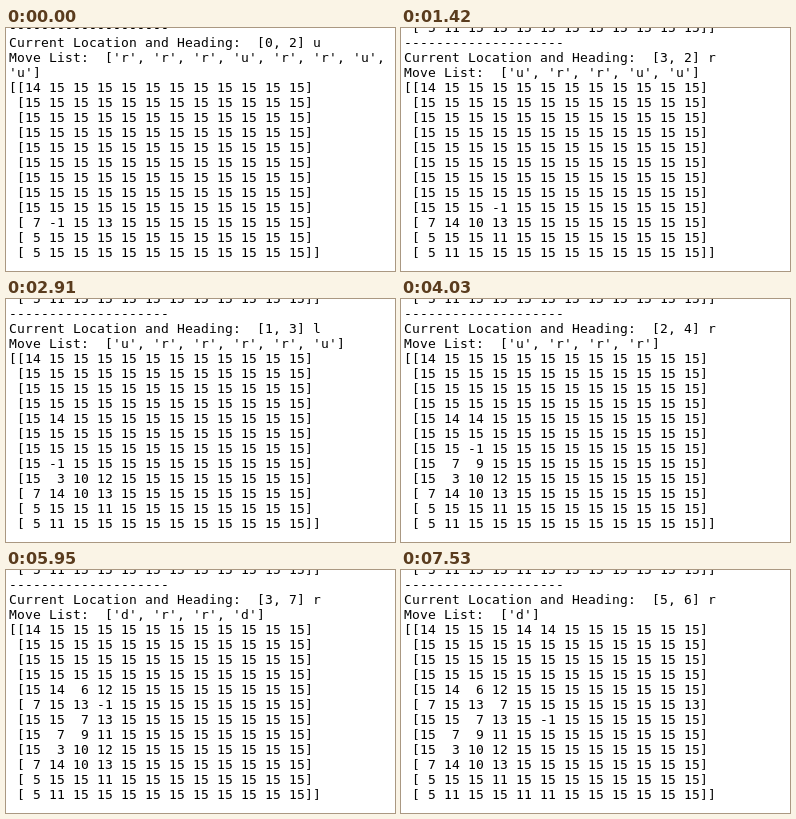
An HTML page that plays this animation: 389x243 px, repeating every 8000 ms.

```html
<!DOCTYPE html>
<html lang="en">
<head>
<meta charset="utf-8">
<title>Maze explorer log</title>
<style>
  html, body { margin: 0; width: 100%; height: 100%; overflow: hidden; background: #fff; }
  svg { display: block; width: 389px; height: 243px; }
  text {
    font-family: "DejaVu Sans Mono", monospace;
    font-size: 13px;
    fill: #000;
    white-space: pre;
  }
</style>
</head>
<body>
<svg id="screen" viewBox="0 0 389 243"></svg>
<script>
const LOOP = 8000, SIZE = 12, COLS = 48, LINES = 16, CHAR_W = 8, LINE_H = 15;
const TIMES = [0, 420, 850, 1420, 1960, 2380, 2910, 3470,
  4030, 4420, 5000, 5420, 5950, 6370, 6950, 7530];

// Directions in clockwise order; direction i owns bit 1 << i of a cell's openings
const DIRS = 'urdl';
const DELTA = [[0, 1], [1, 0], [0, -1], [-1, 0]];

// Walls of the maze, by the xy of the cell on their left or below them
const RIGHT_WALLS = '00 01 03 04 15 17 24 26 32 33 35 37 64'.split(' ');
const TOP_WALLS = '12 17 21 22 23 27 30 33 37'.split(' ');

// Routes to the goal; the next one is taken when the current one turns out blocked
const ROUTES = 'rrrurruu lurrru lurrrru rurrr urrrd urrrdd rdrrd ddrru'.split(' ');

const move = ([x, y], d) => [x + DELTA[d][0], y + DELTA[d][1]];
const inside = cell => cell.every(v => v >= 0 && v < SIZE);

function hasWall(cell, d) {
  const next = move(cell, d);
  const owner = d < 2 ? cell : next;
  return !inside(next) || (d % 2 ? RIGHT_WALLS : TOP_WALLS).includes(owner.join(''));
}

// Look left, ahead and right, and close the side where each ray ends
function sense(grid, pos, heading) {
  for (const turn of [3, 0, 1]) {
    const d = (heading + turn) % 4;
    let cell = pos;
    while (!hasWall(cell, d)) cell = move(cell, d);
    grid[cell[1]][cell[0]] &= ~(1 << d);
  }
}

function isBlocked(grid, pos, route) {
  for (const step of route) {
    const d = DIRS.indexOf(step);
    if (!(grid[pos[1]][pos[0]] & 1 << d)) return true;
    pos = move(pos, d);
  }
  return false;
}

function formatGrid(grid, [mx, my]) {
  return grid.map((row, y) => {
    const cells = row.map((v, x) => String(x === mx && y === my ? -1 : v).padStart(2));
    return (y < SIZE - 1 ? ' [' : '[[') + cells.join(' ') + (y ? ']' : ']]');
  }).reverse();
}

// Explore the maze once, keeping the terminal's visible lines for every step
function buildScreens() {
  const grid = Array.from({ length: SIZE }, () => Array(SIZE).fill(15));
  const routes = [...ROUTES];
  let pos = [0, 2], heading = 0, route = routes.shift(), log = [];
  sense(grid, [0, 0], heading);
  sense(grid, [0, 1], heading);

  return TIMES.map(start => {
    sense(grid, pos, heading);
    if (isBlocked(grid, pos, route)) route = routes.shift();
    const turn = DIRS.indexOf(route[0]);
    const next = move(pos, turn);
    const moves = 'Move List:  [' + [...route].map(m => `'${m}'`).join(', ') + ']';

    log.push('-'.repeat(20), `Current Location and Heading:  [${pos.join(', ')}] ${DIRS[heading]}`);
    for (let i = 0; i < moves.length; i += COLS) log.push(moves.slice(i, i + COLS));
    log = log.concat(formatGrid(grid, next)).slice(-LINES);

    pos = next;
    heading = turn;
    route = route.slice(1);
    return { start, lines: [...log] };
  });
}

const screens = buildScreens();
const svg = document.getElementById('screen');
const columns = Array.from({ length: COLS }, (_, i) => 3 + CHAR_W * i).join(' ');
const rows = Array.from({ length: LINES }, (_, i) => {
  const row = document.createElementNS('http://www.w3.org/2000/svg', 'text');
  row.setAttribute('x', columns);
  row.setAttribute('y', 4 + LINE_H * i);
  return svg.appendChild(row);
});

let shown = null;
function draw(time) {
  const t = time % LOOP;
  const screen = screens.filter(s => s.start <= t).pop();
  if (screen === shown) return;
  shown = screen;
  rows.forEach((row, i) => { row.textContent = screen.lines[i]; });
}

const began = performance.now();
function tick() {
  draw(performance.now() - began);
  requestAnimationFrame(tick);
}
tick();
</script>
</body>
</html>
```
